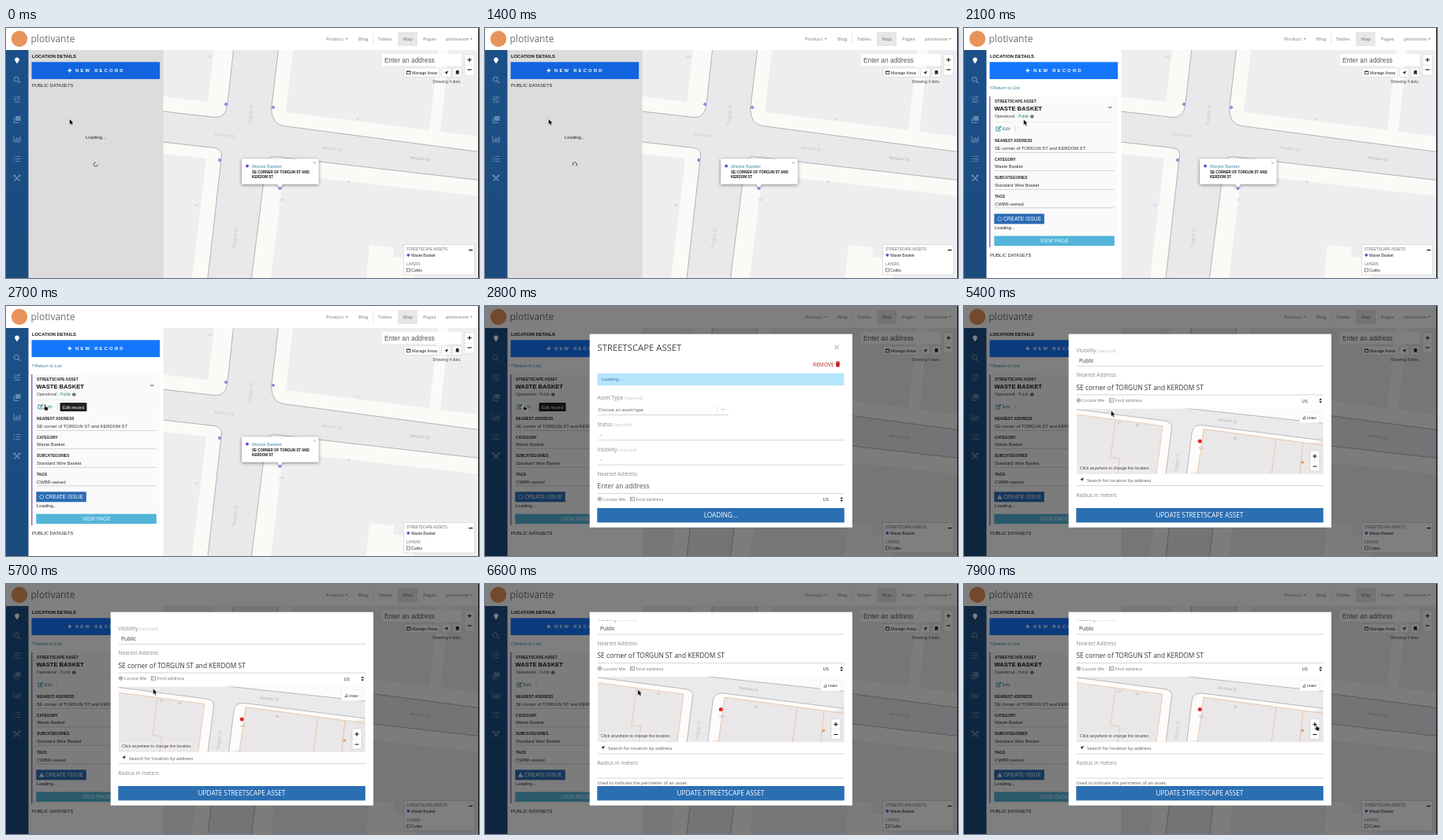
Animation of 600x318 px, one loop 8000 ms. Source, as an HTML page:

```html
<!DOCTYPE html>
<html lang="en">
<head>
<meta charset="utf-8">
<title>Asset editor</title>
<style>
html, body { margin: 0; width: 100%; height: 100%; overflow: hidden; background: #fff; }
svg { display: block; width: 600px; height: 318px; }
text { font-family: "Liberation Sans", Arial, sans-serif; white-space: pre; }
.o { font-family: "Open Sans", "Noto Sans", sans-serif; }
.b { font-weight: 700; }
.s { font-weight: 600; }
.m { text-anchor: middle; }
.e { text-anchor: end; }
</style>
</head>
<body>
<svg id="stage" viewBox="0 0 600 318" xmlns="http://www.w3.org/2000/svg"></svg>
<script>
const LOOP = 8000;
const BRAND = 'plotivante';
const ADDRESS = 'SE corner of TORGUN ST and KERDOM ST';

const text = (x, y, size, str, fill = '#222', cls = '', extra = '') =>
  `<text x="${x}" y="${y}" font-size="${size}" fill="${fill}" class="${cls}" ${extra}>${str}</text>`;
const rect = (x, y, w, h, fill, extra = '') =>
  `<rect x="${x}" y="${y}" width="${w}" height="${h}" fill="${fill}" ${extra}/>`;
const line = (d, stroke, width = .6, extra = '') =>
  `<path d="${d}" fill="none" stroke="${stroke}" stroke-width="${width}" ${extra}/>`;
const shape = (d, fill, extra = '') => `<path d="${d}" fill="${fill}" ${extra}/>`;
const dot = (x, y, r, fill, extra = '') => `<circle cx="${x}" cy="${y}" r="${r}" fill="${fill}" ${extra}/>`;
const group = (id, body, extra = '') => `<g id="${id}" ${extra}>${body}</g>`;
const turned = (x, y, angle, size, str, fill) =>
  text(x, y, size, str, fill, 'o m', `transform="rotate(${angle} ${x} ${y})"`);
const plus = (x, y, r, color, w = 1.2) => line(`M${x - r} ${y}h${2 * r}M${x} ${y - r}v${2 * r}`, color, w);
const minus = (x, y, r, color) => line(`M${x - r} ${y}h${2 * r}`, color, 1.2);
const cross = (x, y, r, color, w) =>
  line(`M${x - r} ${y - r}l${2 * r} ${2 * r}M${x + r} ${y - r}l${-2 * r} ${2 * r}`, color, w);
const locator = (x, y) => shape(`M${x} ${y}l5-2.2-2.2 5-.5-2.4z`, '#222');

function header() {
  const nav = (x, s, fill = '#999') => text(x, 16, 5.9, s, fill, 'o s');
  const caret = x => shape(`M${x} 13h3.4l-1.7 2.1z`, '#999');
  return rect(0, 0, 600, 28, '#fff') + dot(17, 13.7, 10.2, '#e8935a') +
    text(31.5, 18, 12, BRAND, '#6f6f6f', 'o') +
    rect(497, 5, 25, 18, '#e7e7e7') +
    nav(406, 'Product') + caret(430.5) + nav(447, 'Blog') + line('M466 6v16', '#ccc', .5) +
    nav(472, 'Tables') + nav(503.5, 'Map', '#888') + nav(529, 'Pages') + nav(558, BRAND) + caret(588.5);
}

function sidebar() {
  const c = '#6488b0';
  const rows = (y, f) => [-3, 0, 3].map((d, i) => f(y + d, i)).join('');
  return rect(0, 28, 28.5, 290, 'url(#side)') +
    shape('M14 45.5c-1.2-2.3-2.8-3.5-2.8-5.2a2.8 2.8 0 0 1 5.6 0c0 1.7-1.6 2.9-2.8 5.2z', '#fff') +
    dot(13.2, 65.2, 2.8, 'none', `stroke="${c}" stroke-width="1.2"`) + line('M15.3 67.3l2.8 2.8', c, 1.4) +
    rows(91, (y, i) => line(`M9.7 ${y}h8.6`, c, .9) + rect([15, 11, 14][i], y - 1, 1.4, 2, c)) +
    rect(12, 112, 6.5, 6, c) + line('M10.3 114v6.3h6.3', c, 1.2) +
    line('M9.8 137v8h8.8', c, 1) + line('M12 144v-3M14 144v-5M16 144v-3.6M18 144v-6', c, 1.2) +
    rows(166.5, y => line(`M9.6 ${y}h1.6M12.4 ${y}h6`, c, 1.2)) +
    cross(14, 191, 3.4, c, 1.5) + dot(10.7, 187.8, 1.5, c) + dot(17.2, 187.8, 1.5, c);
}

function map() {
  const walk = '#fbfaf7', block = '#eeedf0', label = '#c3c2c6';
  const curbs = [
    'M288.5 28L281 96Q279.5 115 264 113.5L199 106',
    'M345.5 28L336.5 103Q337 122 352 124.5L600 157.5',
    'M199 145L265 152.5Q274 154 273.5 162L256 318',
    'M311.5 318L328 186Q329 163 340 163.5L600 193.5'
  ];
  const ends = ['V28Z', 'V28Z', 'H199Z', 'V318Z'];
  const blocks = [
    'M199 28H264L256 94 199 87Z', 'M364 28H548L537 130 355 107Z', 'M562 28H600V138L551 132Z',
    'M199 160L254 166 236 318H199Z', 'M352 186L600 214V318H336Z'
  ];
  const numbers = [[258, 38, '202'], [446, 117, '92'], [435, 197, '80'], [349, 220, '204'], [242, 227, '99']];
  return rect(199, 28, 401, 290, '#e9e8eb') +
    curbs.map((d, i) => shape(d + ends[i], walk)).join('') +
    blocks.map(d => shape(d, block)).join('') +
    shape('M461 276L492 279 491 291 519 294 517 318H457Z', walk) +
    curbs.map(d => line(d, '#a4a3a8', .8)).join('') +
    turned(312, 111, -83, 6, 'Torgun St', label) + turned(292.5, 267, -83, 6, 'Torgun St', label) +
    turned(277, 138, 7, 5.2, 'Kerdom St', label) + turned(413, 155, 7, 5.2, 'Kerdom St', label) +
    turned(525, 168, 7, 5.2, 'Kerdom St', '#aaa9ae') +
    numbers.map(n => text(n[0], n[1], 4, n[2], label, 'm')).join('') +
    [[279, 97], [339, 101], [271, 168], [347.5, 204]]
      .map(([x, y]) => dot(x, y, 1.4, '#d9d4ff', 'stroke="#5546c8" stroke-width=".9"')).join('') +
    shape('M299 166.5H396.5V198.5H351L347.5 202.5 344 198.5H299Z', '#fff', 'filter="url(#shadow)"') +
    dot(306, 175.5, 2, '#6b4fd0') + text(312, 177.5, 6.1, 'Waste Basket', '#2f7f9c', 'o') +
    text(312, 185, 4.5, 'SE CORNER OF TORGUN ST AND', '#111', 'b') +
    text(312, 191, 4.5, 'KERDOM ST', '#111', 'b') + cross(391.5, 171.5, 1.6, '#999', .6) +
    rect(477, 33, 101, 15, '#fff') + text(480, 43.5, 8.4, 'Enter an address', '#555') +
    rect(582, 34, 12, 26, '#fff', 'stroke="#ccc" stroke-width=".4"') + line('M582 47h12', '#ccc', .4) +
    plus(588, 40.5, 2.6, '#222') + minus(588, 53, 2.6, '#222') +
    [[505, 45], [552.5, 12], [567, 11]].map(([x, w]) =>
      rect(x, 51, w, 11.5, '#fff', 'rx="1" stroke="#bbb" stroke-width=".4"')).join('') +
    rect(508.3, 55, 4.6, 3.8, 'none', 'stroke="#333" stroke-width=".8"') + line('M508.3 55.4h4.6', '#333', 1) +
    text(515, 58.7, 5, 'Manage Areas') + locator(556, 56.8) +
    shape('M570.7 54h3.8v5.6l-1.9-1.5-1.9 1.5z', '#222') +
    text(577.5, 70.2, 5.1, 'Showing 4 dots.', '#444', 'e') +
    rect(504.5, 275.5, 90, 38.5, '#fff', 'stroke="#ccc" stroke-width=".6"') +
    text(508, 283.2, 4.5, 'STREETSCAPE ASSETS', '#666') + minus(589.5, 282.5, 2.4, '#111') +
    dot(510.3, 288.8, 1.9, '#6b4fd0') + text(514, 290.7, 5, 'Waste Basket') +
    text(508, 302, 4.5, 'LAYERS', '#666') +
    rect(508.4, 306, 4, 4, '#fff', 'stroke="#444" stroke-width=".6"') + text(514, 310, 5.2, 'Curbs');
}

function panel() {
  const head = color => text(33, 38, 5.8, 'LOCATION DETAILS', '#111', 'b') +
    rect(32.5, 43.3, 162.7, 21.7, color) + plus(80.8, 54, 2.4, '#fff', 1.3) +
    text(88, 56.2, 5.8, 'NEW RECORD', '#fff', 'b', 'letter-spacing="2.25"');
  const field = (y, name, value) => text(39, y, 4.8, name, '#222', 'b') +
    text(39, y + 9.7, 5.8, value, '#333') + line(`M39 ${y + 13}H191`, '#aaa', .5);
  const loading = rect(28.5, 28, 171, 290, '#dcdcdc') + head('#1164de') +
    text(33, 74.6, 5.8, 'PUBLIC DATASETS') + text(101, 140.6, 5.8, 'Loading...') +
    group('spinner', line('M116.5 173.5a2.6 2.6 0 1 1-2.6-2.6', '#333', .8));
  const details = rect(28.5, 28, 171, 290, '#fff') + head('#1477fb') +
    line('M34.8 73.7l-1.4 1.7 1.4 1.7', '#2f7f9c', .8) + text(36.3, 77.5, 5.8, 'Return to List', '#2f7f9c') +
    rect(32, 87, 1.7, 192, '#8d6cb4') + rect(33.7, 87, 161.5, 192, '#fafafb') +
    text(39, 95, 4.8, 'STREETSCAPE ASSET', '#222', 'b') +
    text(38.5, 105.2, 7.6, 'WASTE BASKET', '#111', 'b') + line('M183.3 100l2 2 2-2', '#333', 1) +
    text(39, 114.3, 4.9, 'Operational', '#444') + line('M66 110v5', '#bbb', .5) +
    text(69, 114.3, 4.9, 'Public', '#2b7d62') + dot(86.3, 112.6, 2.2, '#555') +
    line('M86.3 112v2M86.3 110.9v.6', '#fff', .6) +
    line('M39 119.5H191', '#ddd', .4) +
    line('M44.5 125.7h-3.6v5.2h5v-2.2', '#2b7f86', .8) + line('M43 129l4-4', '#2b7f86', 1.2) +
    text(48.5, 130, 5.8, 'Edit', '#2b7f86') + line('M65 124v8', '#bbb', .5) +
    field(145.4, 'NEAREST ADDRESS', ADDRESS) + field(168.7, 'CATEGORY', 'Waste Basket') +
    field(192.3, 'SUBCATEGORIES', 'Standard Wire Basket') + field(215.8, 'TAGS', 'CWBR-owned') +
    rect(38.3, 236.3, 63.5, 13, '#2b6cb3') +
    group('dots', dot(45.2, 242.8, 2.4, 'none', 'stroke="#fff" stroke-width="1" stroke-dasharray=".9 .98"')) +
    group('warning', shape('M45.2 239.8l3.2 5.6h-6.4z', '#fff') + line('M45.2 241.6v1.9M45.2 244.1v.7', '#2b6cb3', .8)) +
    text(50, 245.1, 6.6, 'CREATE ISSUE', '#fff') + text(39, 256, 5.8, 'Loading...') +
    rect(38.3, 264.5, 152.5, 12.5, '#52b4d8') + text(114.5, 273, 6.5, 'VIEW PAGE', '#e8f8ff', 'm') +
    text(33, 291.2, 5.8, 'PUBLIC DATASETS') +
    group('tip', rect(68.5, 123, 34, 11, '#222', 'rx="1"') + text(72, 130.5, 5.6, 'Edit record', '#fff'));
  return group('loading', loading) + group('details', details);
}

function locationMap() {
  const walk = '#fdfcfa', block = '#e9e7e8', curb = '#aaa', lot = '#e9b48c';
  const curbs = [
    'M143 232.5L254 247Q264 248.5 263.5 256L256 315',
    'M282.5 315L289 262Q290.5 251.5 302 252.5L456 272',
    'M262 229L456 250'
  ];
  return group('minimap', rect(143, 231.5, 313, 83.5, '#eae9eb') +
    shape(curbs[0] + 'H143Z', walk) + shape(curbs[1] + 'H456V272Z', walk) +
    shape(curbs[2] + 'V229Z', walk) +
    shape('M143 239L252 253.5 244 315H143Z', block) + shape('M304 257.5L456 278V315H296Z', block) +
    curbs.map(d => line(d, curb, .8)).join('') +
    line('M143 239L252 253.5 244 315M192 245.5L186 293 198 295 195 315', lot, .6) +
    line('M296 315L304 257.5 396 270 390 315M396 270L456 278M430 275L426 315', lot, .7) +
    turned(334, 248.5, 7, 5, 'Kerdom St', '#aaa') + turned(272, 300, -83, 5.5, 'Torgun St', '#bbb') +
    text(195, 251, 4, '97', '#aaa') + text(218, 254, 4, '95', '#aaa') +
    text(342, 271, 4, '88', '#aaa') + text(297, 283, 4, '204', '#aaa') +
    shape('M427 300l3-2 2 2-3 2z', '#e79b62') +
    dot(299.2, 273, 2.5, '#e02a2a') +
    rect(143, 302, 92, 11, '#fff', 'opacity=".2"') +
    text(147, 308.6, 5.2, 'Click anywhere to change the location.', '#444') +
    rect(425.5, 236, 25.5, 13.5, '#fff', 'rx="1" stroke="#ddd" stroke-width=".4"') +
    line('M429.5 244.6h4M430.5 243.8v-1.5M432.5 243.8v-3', '#444', .8) + text(434.8, 244.6, 4, 'DRAW', '#333') +
    rect(439, 285, 12, 26, '#fff', 'rx="1" stroke="#bbb" stroke-width=".5"') + line('M439 298h12', '#ccc', .4) +
    plus(445, 292, 2.5, '#111') + minus(445, 305, 2.5, '#111'), 'clip-path="url(#mapClip)"');
}

function modal() {
  const rule = (y, x2 = 456) => line(`M143 ${y}H${x2}`, '#bbb', .6);
  const label = (y, s, need) => text(142.5, y, 6.6, s +
    (need ? '<tspan font-size="5.1" fill="#c4c4c4"> (required)</tspan>' : ''), '#888', 'o');
  const value = (x, y, size, before, after) =>
    `<g class="before">${text(x, y, size, before, '#555', 'o')}</g>` +
    `<g class="after">${text(x, y, size, after, '#333', 'o')}</g>`;
  const fields = label(94.6, 'Asset Type', true) +
    value(143.5, 109, 5.8, 'Choose an asset type', 'Waste Basket') +
    `<g class="after">${cross(286.5, 106.7, 1.6, '#999', .8)}</g>` +
    line('M294.5 102v9.5', '#ccc', .5) + line('M300 106l2 2 2-2', '#aaa', .9) + rule(114, 309) +
    label(128.8, 'Status', true) + value(146, 141.7, 6.7, '-', 'Operational') + rule(146) +
    label(160, 'Visibility', true) + value(146, 172.8, 6.7, '-', 'Public') + rule(177.5) +
    label(191.3, 'Nearest Address') + value(142.5, 207.7, 8.4, 'Enter an address', ADDRESS) + rule(214) +
    dot(145.5, 221, 2.2, 'none', 'stroke="#777" stroke-width=".8"') + dot(145.5, 221, 1, '#777') +
    text(150, 223, 5.85, 'Locate Me', '#777', 'o') +
    rect(184.5, 218.8, 5, 4.4, 'none', 'stroke="#777" stroke-width=".7"') + dot(186.3, 221, .8, '#777') +
    text(191.3, 223, 5.9, 'Find address', '#777', 'o') +
    text(428.5, 223.5, 5.8, 'US', '#222', 'o') +
    shape('M450.3 220.8h4l-2-2.4zM450.3 222.2h4l-2 2.4z', '#222');
  const extra = locationMap() + locator(147, 321.5) +
    text(156, 324.5, 5.8, 'Search for location by address', '#555', 'o') + rule(329.5) +
    label(343.7, 'Radius in meters') + rule(360.5) +
    text(142.5, 368.6, 5.8, 'Used to indicate the perimeter of an asset.', '#555', 'o');
  const body = text(142.5, 56.6, 11.3, 'STREETSCAPE ASSET', '#444', 'o') +
    cross(446, 52.5, 2.8, '#bbb', 1.2) + text(416, 76.8, 6.7, 'REMOVE', '#c22121', 'o') +
    shape('M445 72h5l-.5 5.6h-4zM444.5 70.8h6v.8h-6zM446.5 70h2v.8h-2z', '#c22121') +
    `<g class="before">${rect(142.5, 85.5, 313, 15.5, '#b5e6fb')}${text(148, 95.2, 5.8, 'Loading...', '#2f6db5', 'o')}</g>` +
    group('fields', fields) + group('extra', extra);
  const action = s => text(299, 268.9, 8.25, s, '#fff', 'o m');
  return group('modal', rect(0, 0, 599, 318, '#000', 'opacity=".5"') + rect(132.7, 35.7, 333.3, 246, '#fff') +
    `<g clip-path="url(#bodyClip)">${group('scroller', body)}</g>` +
    rect(142.3, 257, 313.5, 18.4, '#2b6fb3') +
    `<g class="before">${action('LOADING...')}</g><g class="after">${action('UPDATE STREETSCAPE ASSET')}</g>`);
}

const pointers =
  group('arrow', shape('M0 0v7.4l1.7-1.5 1.2 2.7 1.4-.6-1.2-2.6h2.3z', '#000', 'stroke="#fff" stroke-width=".5"')) +
  group('hand', shape('M-.7 0q.7-.8 1.4 0v2.6l3 .8q.6 1-.3 4h-3.3l-2.4-3.2q.2-.9 1.6.2z', '#111', 'stroke="#fff" stroke-width=".5"'));

const stage = document.getElementById('stage');
stage.innerHTML = `<defs>
  <linearGradient id="side" x1="0" y1="0" x2="0" y2="1"><stop stop-color="#1c5089"/><stop offset="1" stop-color="#1b4a7d"/></linearGradient>
  <filter id="shadow" x="-15%" y="-25%" width="130%" height="160%"><feDropShadow dx="0" dy="1" stdDeviation="2" flood-opacity=".5"/></filter>
  <clipPath id="bodyClip"><rect x="133" y="46" width="333" height="211"/></clipPath>
  <clipPath id="mapClip"><rect x="142.5" y="231.5" width="313" height="83"/></clipPath></defs>` +
  map() + panel() + sidebar() + header() + modal() + rect(599, 0, 1, 318, '#111') + pointers;

const el = id => document.getElementById(id);
const show = (node, on) => { node.style.display = on ? '' : 'none'; };
const showAll = (cls, on) => stage.querySelectorAll('.' + cls).forEach(n => show(n, on));
const move = (id, x, y) => el(id).setAttribute('transform', `translate(${x} ${y})`);
const spin = (id, angle, x, y) => el(id).setAttribute('transform', `rotate(${angle} ${x} ${y})`);

// Keys are [time, ...values]; values ease between neighbouring keys.
function at(keys, t) {
  const i = keys.findIndex(k => k[0] > t);
  if (i < 0) return keys[keys.length - 1].slice(1);
  if (i === 0) return keys[0].slice(1);
  const a = keys[i - 1], b = keys[i];
  const u = (t - a[0]) / (b[0] - a[0]), e = u * u * (3 - 2 * u);
  return a.slice(1).map((v, j) => v + (b[j + 1] - v) * e);
}

const cursorPath = [[0, 80.5, 115.5], [1700, 80.5, 115.5], [2100, 75.5, 116.2], [2500, 49.5, 125.5],
  [3100, 49.5, 125.5], [3900, 187, 135], [4500, 187, 135], [5000, 186.5, 133], [6500, 186.5, 133], [7500, 447, 179]];
const scrollPath = [[4600, 0], [5400, 101], [5900, 101], [6300, 113.5]];

function draw(t) {
  const ready = t >= 3600;
  show(el('loading'), t < 1600);
  show(el('details'), t >= 1600);
  show(el('tip'), t >= 2500 && t < 3200);
  show(el('modal'), t >= 2800);
  show(el('dots'), !ready);
  show(el('warning'), ready);
  showAll('before', !ready);
  showAll('after', ready);
  show(el('extra'), t >= 4600);
  move('fields', 0, ready ? 0 : 24.5);
  move('scroller', 0, -at(scrollPath, t)[0]);
  spin('spinner', t * .36, 113.9, 173.5);
  spin('dots', t * .18, 45.2, 242.8);
  const [x, y] = at(cursorPath, t);
  const hand = (t >= 2400 && t < 3100) || t >= 7400;
  show(el('arrow'), !hand);
  show(el('hand'), hand);
  move(hand ? 'hand' : 'arrow', x, y);
}

function tick() {
  draw(Math.floor(performance.now() % LOOP / 100) * 100);
  requestAnimationFrame(tick);
}
tick();
</script>
</body>
</html>
```
